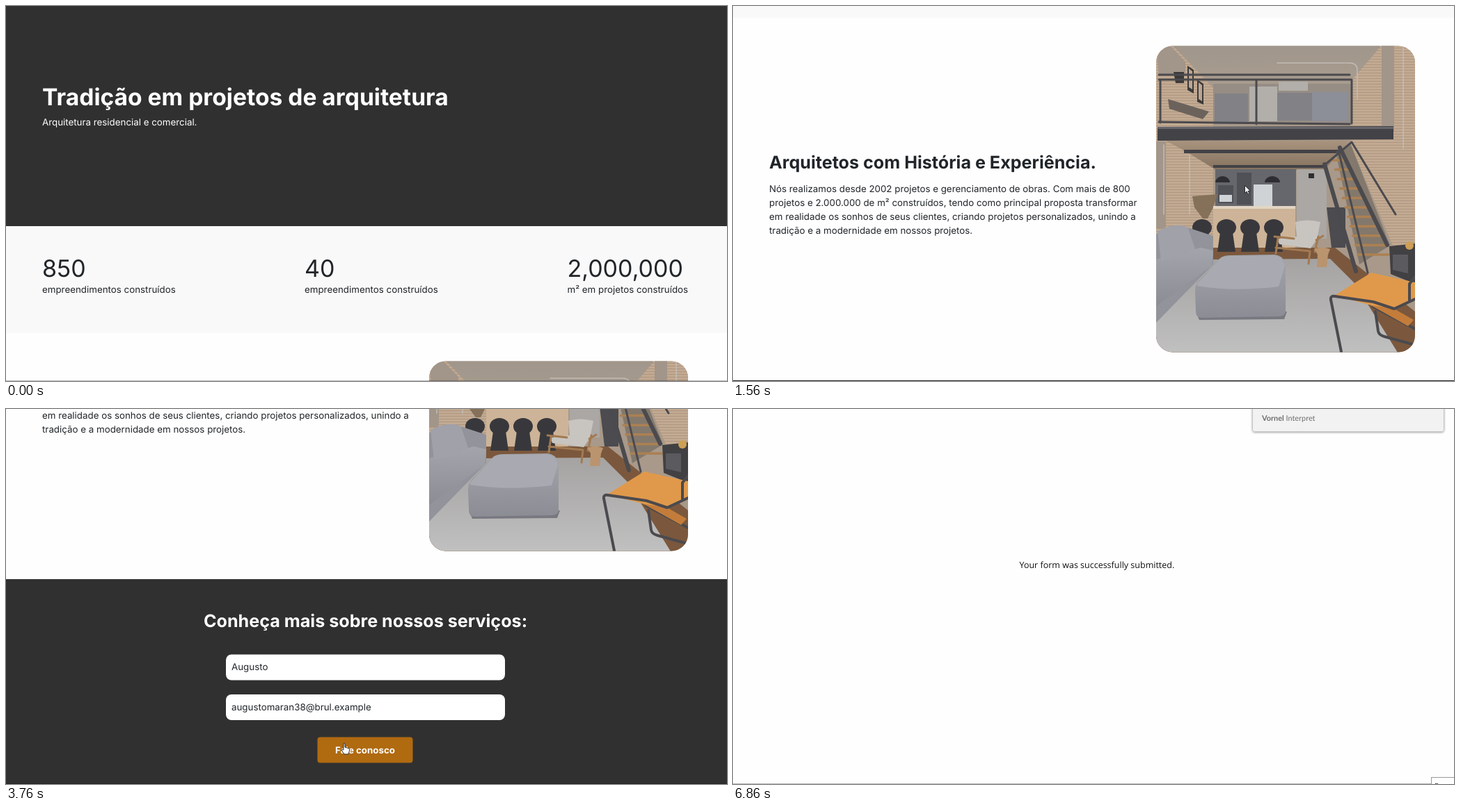
These frames come from a looping animation (1036x540 px, 6.93 s). An HTML page:

```html
<!DOCTYPE html>
<html lang="pt">
<head>
<meta charset="utf-8">
<title>Arquitetura</title>
<style>
html, body { margin: 0; width: 100%; height: 100%; overflow: hidden; background: #fefefe; }
svg { display: block; width: 100%; height: 100%; }
text { font: 400 13.333px Inter, sans-serif; font-optical-sizing: none; text-rendering: geometricPrecision; fill: #212529; white-space: pre; }
.h1 { font-size: 33.6px; }
.h2 { font-size: 25.15px; }
.num { font-size: 34px; }
.b { font-weight: 700; }
.w { fill: #fff; }
.line { fill: none; stroke: #4b4a4e; stroke-linecap: round; stroke-linejoin: round; }
</style>
</head>
<body>
<svg viewBox="0 0 1036 540">
  <defs>
    <clipPath id="frame"><rect x="608" y="57.5" width="372" height="441" rx="24"/></clipPath>
    <pattern id="brick" width="12" height="4" patternUnits="userSpaceOnUse">
      <rect width="12" height="4" fill="#c2aa92"/><rect width="12" height="1" fill="#ad9580"/>
    </pattern>
    <linearGradient id="rug" x2="0" y2="1"><stop stop-color="#a5a3a2"/><stop offset="1" stop-color="#c0c0c0"/></linearGradient>
    <linearGradient id="roof" x2="0" y2="1"><stop stop-color="#a0968b"/><stop offset="1" stop-color="#a89c8f"/></linearGradient>
    <linearGradient id="under" x2="0" y2="1"><stop stop-color="#a8937e"/><stop offset="1" stop-color="#85735f"/></linearGradient>
    <linearGradient id="fabric" x2="0" y2="1"><stop stop-color="#a4a5ac"/><stop offset="1" stop-color="#8b8c94"/></linearGradient>
    <filter id="shade" x="-5%" y="-20%" width="110%" height="150%"><feDropShadow dx="0" dy="1" stdDeviation="1.5" flood-opacity=".35"/></filter>
  </defs>

  <g id="page">
    <rect width="1036" height="1300" fill="#fefefe"/>
    <rect width="1036" height="317" fill="#303030"/>
    <text class="h1 b w" x="52" y="143">Tradição em projetos de arquitetura</text>
    <text class="w" x="52" y="172">Arquitetura residencial e comercial.</text>

    <rect y="317" width="1036" height="154" fill="#f9f9f9"/>
    <g id="stats"></g>

    <text class="h2 b" x="52" y="688">Arquitetos com História e Experiência.</text>
    <g id="about"></g>

    <g transform="translate(0 454)"><g clip-path="url(#frame)">
      <rect x="608" y="57" width="372" height="442" fill="#a8998a"/>
      <path fill="url(#roof)" d="M625 57H930L888 112H682Z"/>
      <path fill="url(#brick)" d="M608 57H632L690 118V345H608ZM980 57H932L888 108V200L950 350H980Z"/>
      <path fill="#a2958a" d="M932 57H950V180H932ZM608 57H628L650 80V100H612ZM608 195H622V320H608Z"/>
      <path fill="#968d85" d="M690 112H888V170H690Z"/>
      <path fill="#828186" d="M692 126H740V170H692ZM780 125H832V165H780Z"/>
      <path fill="#b2afab" d="M742 116H782V166H742ZM784 109H826V122H784Z"/>
      <path fill="#8c8e98" d="M832 124H884V166H832Z"/>
      <path fill="#6b625b" d="M625 134L684 152L675 163L627 148Z"/>
      <path fill="#3c3938" d="M653 86L662 92V126L653 121ZM667 106L676 112V142L667 138ZM633 95H648V111H636Z"/>
      <path fill="#bba592" d="M655 90L660 94V120L655 117ZM669 110L674 114V137L669 134Z"/>
      <path class="line" stroke-width="3" d="M612 99H886M612 106H889V169M614 106V168M752 106V170M612 167L886 170"/>
      <path class="line" style="stroke:#c2bcb5" stroke-width="1.5" d="M782 82H886Q897 82 897 93V134M963 57V205M656 215V300M619 200V300"/>
      <path fill="#424247" d="M610 174L949 173V192L610 194Z"/>
      <path fill="#66666c" d="M610 174H949V177H610Z"/>
      <path fill="url(#under)" d="M622 194H886L850 236H694L650 209Z"/>
      <path fill="#424247" d="M648 207H870V212H648ZM690 229H850V233H690Z"/>
      <path fill="#66676c" d="M693 235H809V288H693Z"/>
      <path fill="#505157" d="M697 258H719V284H697ZM724 240H745V286H724Z"/>
      <path fill="#d0d3d6" d="M748 257H775V288H748ZM699 272H717V282H699Z"/>
      <path fill="#aaa7a4" d="M810 235H853V335H810Z"/>
      <path fill="#2e2e32" d="M693 254A10.500 9 0 0 1 714 254ZM764 254A11 9 0 0 1 786 254ZM827 241H835V248H827Z"/>
      <path fill="#85705a" d="M660 274L696 271L690 290L682 306H675L663 290Z"/>
      <path fill="#cdb498" d="M690 290H808V350H690Z"/>
      <path fill="#e2d5c4" d="M690 288H808V292H690Z"/>
      <path fill="#7b583d" d="M608 348H865L980 440V499H608Z"/>
      <path fill="url(#rug)" d="M690 365L858 364L894 400L955 499H608V430Z"/>
      <g id="chairs" fill="#38383c"></g>
      <path fill="#92939b" d="M608 328L650 318L690 331V372L608 456Z"/>
      <path fill="url(#fabric)" d="M608 365L672 348L690 352L688 374L608 432Z"/>
      <path fill="#a0a1a9" d="M610 324Q640 310 654 320L664 350Q640 363 615 367Z"/>
      <path fill="#777880" d="M666 443L796 440L792 451L670 452Z"/>
      <path fill="url(#fabric)" d="M664 410Q664 400 672 393L700 363Q705 359 715 359L778 358Q790 359 794 371V440Q793 447 784 447L674 449Q665 449 665 440Z"/>
      <path fill="#a9aab1" d="M667 400L700 364Q705 360 715 360H778Q790 361 793 374L784 404Q720 412 667 403Z"/>
      <path fill="#c8c5c0" d="M808 311Q825 306 844 311L839 336L830 349L785 343L782 335L810 332Z"/>
      <path class="line" style="stroke:#a37a52" stroke-width="3" d="M778 332L806 335M783 335L780 356M841 332L836 354M780 348L829 353L827 371M848 331L838 337"/>
      <path fill="#b9946e" d="M835 350Q846 345 858 350L855 358L853 376H839L840 358Z"/>
      <path fill="#4b4b50" d="M853 290H880V348H860Z"/>
      <path fill="#665d55" opacity=".55" d="M866 210L888 200L944 345L900 372Z"/>
      <path id="treads" class="line" style="stroke:#ac8052" stroke-width="3.5"/>
      <path class="line" stroke-width="6" d="M850 228L895 382M872 204L940 344"/>
      <path class="line" stroke-width="3" d="M849 230L889 196L952 300M870 208L912 384"/>
      <path fill="#414043" d="M943 346L980 342V400L945 386Z"/>
      <path fill="#5b5b5f" d="M948 358H970V385L948 380Z"/>
      <circle cx="972" cy="345" r="6" fill="#cda055"/>
      <path class="line" stroke-width="4" d="M923 440L927 468Q928 474 936 476L980 488M920 433L980 465"/>
      <path fill="#e0994b" d="M864 417L917 384L980 398V424L948 435L976 452L970 460L917 431Z"/>
      <path fill="#c47c3a" d="M948 435L978 452L970 461L917 431Z"/>
      <path class="line" stroke-width="4" d="M874 498L859 423Q858 417 865 418L920 426L950 436L980 422M980 390L972 400V425"/>
    </g></g>

    <rect y="993" width="1036" height="310" fill="#303030"/>
    <text class="h2 b w" x="516.500" y="1062" text-anchor="middle">Conheça mais sobre nossos serviços:</text>
    <rect x="316" y="1101.500" width="401" height="37" rx="8" fill="#fff"/>
    <text x="324" y="1124">Augusto</text>
    <rect x="316" y="1159" width="401" height="37" rx="8" fill="#fff"/>
    <text x="324" y="1181.500">augustomaran38@brul.example</text>
    <rect id="ring" x="446.500" y="1219.500" width="139" height="39" rx="5" fill="#101010" stroke="#fff" stroke-width="1.3"/>
    <rect id="button" x="447.500" y="1220.500" width="137" height="37" rx="4"/>
    <text class="b w" x="516" y="1244" text-anchor="middle">Fale conosco</text>
  </g>

  <g id="done">
    <rect width="1036" height="540" fill="#fefefe"/>
    <text id="message" x="411.500" y="229" style="font:12.5px 'Open Sans',sans-serif;fill:#111">Your form was successfully submitted.</text>
    <g id="popup">
      <rect x="746.500" y="-10" width="275" height="42.500" rx="3" fill="#f2f2f2" stroke="#c6c6c6" filter="url(#shade)"/>
      <text x="760" y="17" style="font:10.9px Lato,sans-serif;fill:#6e6e6e"><tspan font-weight="700">Vornel</tspan> Interpret</text>
    </g>
  </g>

  <rect y="539" width="1036" height="1" fill="#000" opacity=".27"/>
  <g id="tip">
    <rect x="1003.500" y="530.500" width="40" height="20" fill="#fff" stroke="#999"/>
    <text x="1008" y="546" style="font:10px 'Open Sans',sans-serif">Pesquisar</text>
  </g>

  <g id="cursor">
    <path id="arrow" d="M.5 .5V11.500L3.200 9L5 13L6.800 12.200L5 8.300H8.300Z" fill="#fff" stroke="#222" stroke-width=".9"/>
    <path id="beam" d="M-2.500-5H2.500M0-5V5M-2.500 5H2.500" fill="none"/>
    <path id="hand" d="M-1 1Q0-.5 1 1V6L6 7.500Q8 8 7.500 11L6 16H0L-4 10Q-4 8-1 10Z" fill="#fff" stroke="#222" stroke-width=".9"/>
  </g>
</svg>
<script>
const LOOP = 6930;
const $ = id => document.getElementById(id);
const show = (id, on) => { $(id).style.display = on ? "" : "none"; };
const label = (x, y, s, cls = "") => `<text class="${cls}" x="${x}" y="${y}">${s}</text>`;

$("stats").innerHTML = [
  [52, "850", "empreendimentos construídos"],
  [429, "40", "empreendimentos construídos"],
  [806.5, "2,000,000", "m² em projetos construídos"]
].map(([x, n, s]) => label(x, 389.5, n, "num") + label(x, 412.5, s)).join("");

$("about").innerHTML = [
  "Nós realizamos desde 2002 projetos e gerenciamento de obras. Com mais de 800",
  "projetos e 2.000.000 de m² construídos, tendo como principal proposta transformar",
  "em realidade os sonhos de seus clientes, criando projetos personalizados, unindo a",
  "tradição e a modernidade em nossos projetos."
].map((s, i) => label(52, 721.5 + 20 * i, s)).join("");

$("chairs").innerHTML = [674, 709, 743, 777].map(x =>
  `<ellipse cx="${x}" cy="319" rx="14" ry="12"/><path d="M${x - 9} 326H${x + 9}L${x + 13} 354H${x - 13}Z"/>`).join("");

$("treads").setAttribute("d", Array.from({ length: 11 }, (_, i) =>
  `M${862 + i * 3.6} ${222 + i * 13.6}H${882 + i * 6}`).join(""));

// Rows of [time, value, ...], joined by straight lines.
const scrollKeys = [
  [0, 0], [350, 0], [500, 40], [710, 121], [770, 127], [900, 183], [1100, 320],
  [1370, 453], [1560, 454], [1680, 500], [1960, 678], [2090, 748]
];
const cursorKeys = [
  [0, 760, 545], [70, 760, 538], [420, 735, 258], [2750, 735, 258], [2820, 732, 292],
  [3100, 670, 340], [3480, 461, 423], [3550, 463, 430], [3800, 490, 490], [4000, 530, 499],
  [4220, 582, 500], [4300, 583, 498], [4570, 591, 444], [4970, 643, 292], [5030, 645, 292],
  [5300, 830, 410], [5570, 998, 541]
];

function at(keys, t) {
  const i = keys.findIndex(k => k[0] > t);
  if (i < 0) return keys[keys.length - 1].slice(1);
  const a = keys[i - 1], b = keys[i], p = (t - a[0]) / (b[0] - a[0]);
  return a.slice(1).map((v, j) => v + (b[j + 1] - v) * p);
}

const inside = (x, y, l, t, r, b) => x >= l && x <= r && y >= t && y <= b;

function draw(t) {
  const [scroll] = at(scrollKeys, t);
  $("page").setAttribute("transform", `translate(0 ${-Math.round(scroll)})`);

  const [x, y] = at(cursorKeys, t).map(Math.round);
  const formReady = t >= 2750;
  const onButton = formReady && inside(x, y, 447, 472, 585, 510);
  const onField = formReady && (inside(x, y, 316, 353, 717, 390) || inside(x, y, 316, 411, 717, 448));
  const onTitle = formReady && inside(x, y, 285, 288, 748, 322);
  $("cursor").setAttribute("transform", `translate(${x} ${y})`);
  show("cursor", t >= 70 && t < 5600);
  show("hand", onButton);
  show("beam", onField || onTitle);
  show("arrow", !onButton && !onField && !onTitle);
  $("beam").setAttribute("stroke", onField ? "#333" : "#aaa");

  $("button").setAttribute("fill", onButton ? "#b06a10" : "#c27512");
  show("ring", t >= 4050);

  show("done", t >= 5780);
  show("message", t >= 5850);
  show("popup", t >= 5990);
  $("tip").style.opacity = Math.min(1, Math.max(0, (t - 6540) / 180));
  show("tip", t >= 6590);
}

const start = performance.now();
function tick() {
  draw((performance.now() - start) % LOOP);
  requestAnimationFrame(tick);
}
tick();
</script>
</body>
</html>
```
